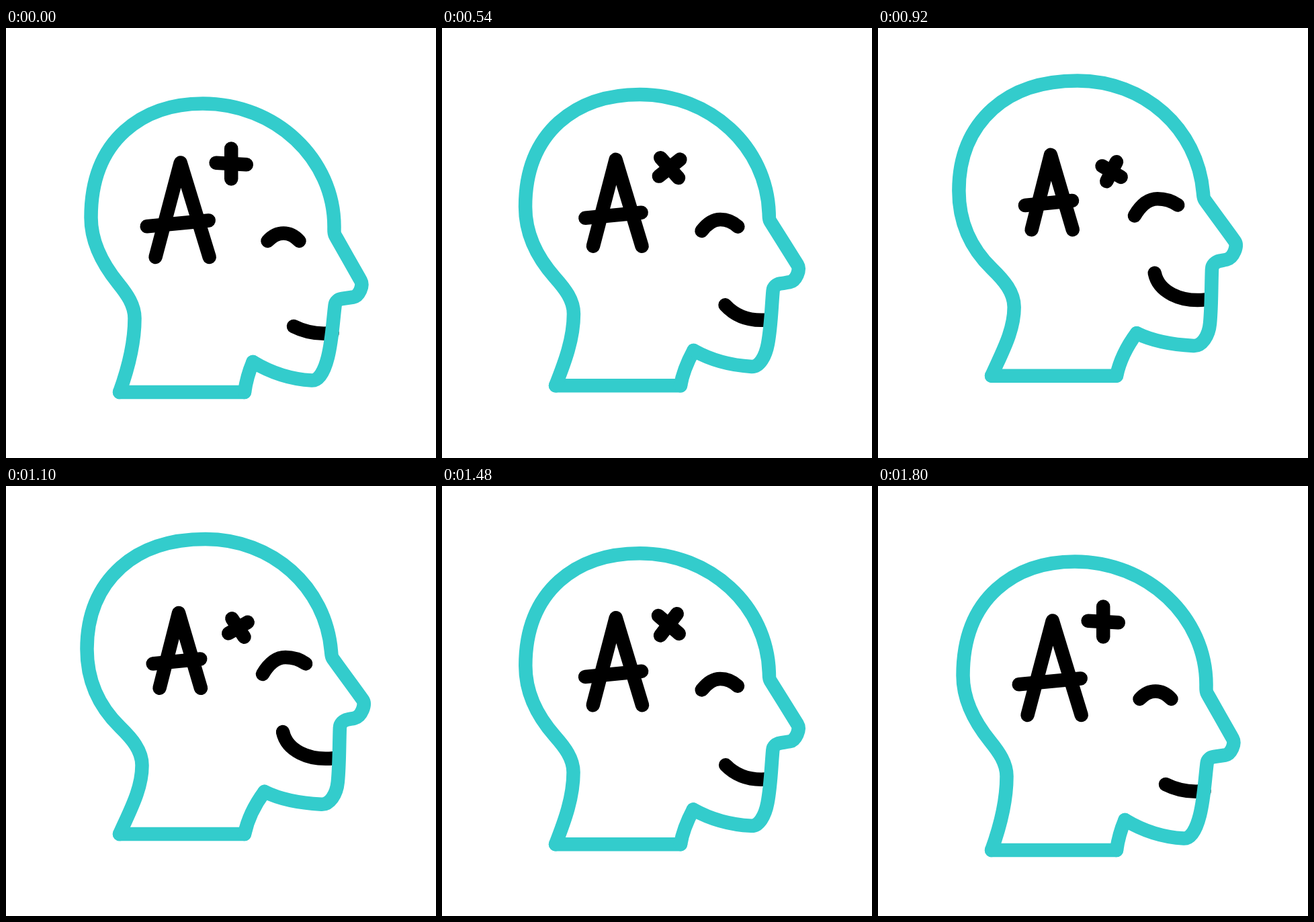
An HTML page with a canvas that plays this animation: 640 px wide and 640 px high, repeating every 2.02 s.

```html
<!DOCTYPE html>
<html lang="en">
<head>
<meta charset="utf-8">
<title>A plus</title>
<style>
  html, body { margin: 0; width: 100%; height: 100%; overflow: hidden; background: #fff; }
  canvas { display: block; width: 100vmin; height: 100vmin; }
</style>
</head>
<body>
<canvas id="stage" width="640" height="640"></canvas>
<script>
const ctx = document.getElementById('stage').getContext('2d');

const LOOP = 2020, STEP = 20, START = 200, MOVE = 1600;
const TEAL = '#33cccc', BLACK = '#000';
const RAD = Math.PI / 180;

// Key point: position and heading (degrees) at rest,
// then how far it shifts and turns by the time the head is fully raised.
const key = (x, y, heading, dx, dy, turn = 0) => lift => ({
  x: x + dx * lift, y: y + dy * lift, heading: heading + turn * lift
});

const base = [key(169, 542, 0, 0, -25), key(355, 542, 0, 0, -25)];
const throat = [key(355, 542, -82, 0, -25, 4), key(367.5, 497, -67, 18, -44, 14)];

const profile = [
  key(367.5, 497, 31, 18, -44, -5),       // jaw
  key(455, 524.5, 3, 15, -53),            // chin
  key(479, 490, -76, 15.5, -52, -9),
  key(489.7, 412, -83, 7.5, -54.5, -5),   // lip
  key(500, 403, -8, 9, -58, -4),
  key(517, 400.5, -8, 2, -57.5, -6),      // nose
  key(528, 376, -119.6, 3, -60.5, -6),
  key(490, 309, -119.6, -3.7, -54.5, -6),
  key(488.5, 296, -90, -4.7, -52, -5),    // brow
  key(293, 112.5, -180, 4, -35),          // crown
  key(176.7, 153.4, -222, -6, -34),
  key(126.5, 282, -270, -6.3, -41),       // back
  key(167, 380, -309, 3, -22, -7),
  key(191.5, 432, -270, 11.5, -17),       // neck
  key(169, 542, -250, 0, -25, 4)
];

const eye = [
  key(389.5, 317, -48, -7.8, -38.7, -12),
  key(413, 305.4, 0, 3.1, -52.6),
  key(436.5, 317, 48, 10, -55, -14)
];
const mouth = [key(428, 444, 27, -16.7, -81.5, 53), key(485.5, 454, -6, 2, -51)];

const smooth = x => x * x * (3 - 2 * x);

// Smooth curve through the key points; sharper bends get longer handles.
function strokeCurve(keys, lift) {
  const nodes = keys.map(k => k(lift));
  ctx.beginPath();
  ctx.moveTo(nodes[0].x, nodes[0].y);
  for (let i = 1; i < nodes.length; i++) {
    const a = nodes[i - 1], b = nodes[i];
    const bend = Math.abs(b.heading - a.heading) / 90;
    const tension = Math.min(0.57, 1 / 3 + 0.22 * bend * bend);
    const handle = ({ heading }) => {
      const ux = Math.cos(heading * RAD), uy = Math.sin(heading * RAD);
      const length = tension * ((b.x - a.x) * ux + (b.y - a.y) * uy);
      return [length * ux, length * uy];
    };
    const [ax, ay] = handle(a), [bx, by] = handle(b);
    ctx.bezierCurveTo(a.x + ax, a.y + ay, b.x - bx, b.y - by, b.x, b.y);
  }
  ctx.stroke();
}

function strokeLine(...points) {
  ctx.beginPath();
  for (const [x, y] of points) ctx.lineTo(x, y);
  ctx.stroke();
}

// The letter shrinks towards a point above its middle; its weight stays.
function strokeLetter(lift) {
  const at = (x, y) => [248.3 + x * (1 - 0.244 * lift), 144.3 + y * (1 - 0.2135 * lift)];
  strokeLine(at(-25.8, 196.7), at(11.4, 56.2), at(54.4, 196.7));
  strokeLine(at(-38.6, 151), at(53.4, 142.2));
}

// The plus drifts away from its pivot while making one full turn.
function strokePlus(lift, turn) {
  const arm = 22.6 - 6.5 * lift;
  const tip = [arm, arm * 0.06];
  ctx.save();
  ctx.translate(335.2 + 9.5 * lift, 202 + 12.5 * lift);
  ctx.rotate(-2 * Math.PI * turn);
  ctx.translate(-2.7 * lift, 1.9 * lift);
  strokeLine([0, -arm], [0, arm]);
  strokeLine(tip.map(v => -v), tip);
  ctx.restore();
}

function draw(time) {
  const t = Math.floor((time % LOOP) / STEP) * STEP;
  const u = Math.min(1, Math.max(0, (t - START) / MOVE));
  const lift = smooth(1 - Math.abs(2 * u - 1));

  ctx.fillStyle = '#fff';
  ctx.fillRect(0, 0, 640, 640);
  ctx.lineWidth = 20.5;
  ctx.lineCap = ctx.lineJoin = 'round';

  ctx.strokeStyle = BLACK;
  strokeLetter(lift);
  strokePlus(lift, smooth(u));
  strokeCurve(eye, lift);
  strokeCurve(mouth, lift);

  ctx.strokeStyle = TEAL;
  for (const part of [base, throat, profile]) strokeCurve(part, lift);
}

const origin = performance.now();
function tick() {
  draw(performance.now() - origin);
  requestAnimationFrame(tick);
}
tick();
</script>
</body>
</html>
```
